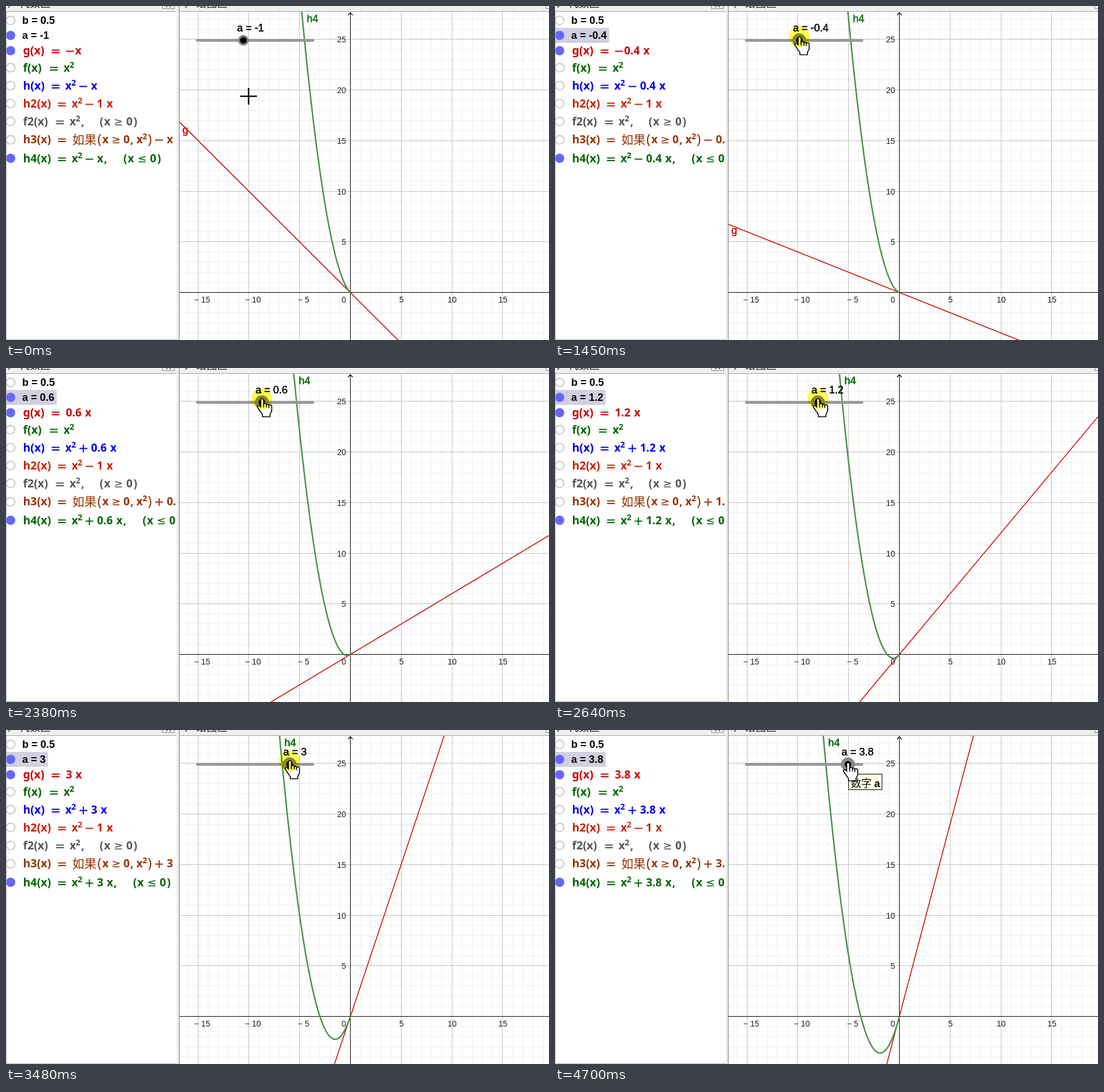
An HTML page with a canvas for the animation above (4.9 s loop, 939 by 579 pixels).

```html
<!DOCTYPE html>
<html lang="zh">
<head>
<meta charset="utf-8">
<style>
html, body { margin: 0; width: 100%; height: 100%; overflow: hidden; background: #fff; }
canvas { display: block; }
</style>
</head>
<body>
<canvas id="stage" width="939" height="579"></canvas>
<script>
const c = document.getElementById('stage').getContext('2d');
const LOOP = 4900, OX = 595.5, OY = 496.6, UNIT = 17.555;
const UI = '"Liberation Sans", Arial, sans-serif';
const MATH = 'bold 19px "Noto Sans", "Open Sans", sans-serif';
const SUP = 'bold 14px "Noto Sans", "Open Sans", sans-serif';
const REL = '19px "DejaVu Sans", sans-serif';
const CJK = '"Noto Sans CJK SC", "Noto Sans CJK", sans-serif';

// Bursts of movement: first step, last step, number of steps
const BURSTS = [[400, 890, 9], [950, 1310, 7], [1450, 1940, 8], [2070, 2590, 9],
  [2640, 3090, 8], [3190, 3680, 9], [3730, 4170, 7], [4420, 4520, 3]];
const SLOPE = [[1130, -1], [1310, -.5], [1730, -.1], [2380, .6], [2950, 2],
  [3090, 2.3], [3480, 3], [3680, 3.3], [4170, 3.8]];
const CROSS_X = [[340, 419.5], [890, 410.5]];
const CROSS_Y = [[340, 156.5], [890, 79.5]];
const HAND_Y = [[1130, 57], [1310, 53.5], [4400, 53.5], [4470, 57]];
const GLOW = [[950, 0], [1010, 1], [4370, 1], [4520, 0]];

const HAND = new Path2D('M-2 14V1Q0-2 3 1V9Q5 7 8 9V10Q10 8 12 11Q15 9 17 12V21L14 27V31H1V27L-4 20L-8 14Q-7 11-4 12Z');
const KNUCKLES = new Path2D('M3 8V15M8 9V15M12 11V16');

function snap(t) {
  let s = 0;
  for (const [from, to, n] of BURSTS) {
    const step = (to - from) / (n - 1);
    if (t >= from) s = Math.min(to, from + Math.floor((t - from + 20) / step) * step);
  }
  return s;
}

function track(t, keys) {
  if (t <= keys[0][0]) return keys[0][1];
  for (let i = 1; i < keys.length; i++) {
    const [t0, v0] = keys[i - 1], [t1, v1] = keys[i];
    if (t <= t1) return v0 + (v1 - v0) * (t - t0) / (t1 - t0);
  }
  return keys[keys.length - 1][1];
}

const px = x => OX + x * UNIT;
const py = y => OY - y * UNIT;

function rect(x, y, w, h, color) {
  c.fillStyle = color;
  c.fillRect(x, y, w, h);
}

function line(points, color, width = 1) {
  c.beginPath();
  points.forEach(([x, y]) => c.lineTo(x, y));
  c.strokeStyle = color;
  c.lineWidth = width;
  c.stroke();
}

function disc(x, y, r, fill, stroke, width = 1) {
  c.beginPath();
  c.arc(x, y, r, 0, 7);
  c.fillStyle = fill;
  c.fill();
  if (stroke) {
    c.strokeStyle = stroke;
    c.lineWidth = width;
    c.stroke();
  }
}

function text(s, x, y, font, color, align = 'left') {
  c.font = font;
  c.fillStyle = color;
  c.textAlign = align;
  c.fillText(s, x, y);
}

// Plot label of medium weight
function label(s, x, y, color) {
  text(s, x, y, '18px ' + UI, color);
  c.strokeStyle = color;
  c.lineWidth = .5;
  c.strokeText(s, x, y);
}

function clipped(x, y, w, h, draw) {
  c.save();
  c.beginPath();
  c.rect(x, y, w, h);
  c.clip();
  draw();
  c.restore();
}

// Algebra rows
function sign(kind, x, y, color) {
  if (kind === '=') {
    rect(x, y - 8.5, 13.5, 2, color);
    rect(x, y - 4, 13.5, 2, color);
    return;
  }
  rect(x, y - 6.5, 13.5, 2, color);
  if (kind === '+') rect(x + 5.75, y - 12.2, 2, 13.4, color);
}

function square(x, y, color) {
  text('x', x, y, MATH, color);
  text('2', x + 10.5, y - 7, SUP, color);
}

// Draws "n x" and returns the position of its x
function term(value, x, y, color) {
  const n = Math.abs(value);
  if (n !== 1) {
    text(n, x, y, MATH, color);
    x += c.measureText(n).width + 6;
  }
  text('x', x, y, MATH, color);
  return x;
}

function signedTerm(value, x, y, color) {
  sign(value < 0 ? '-' : '+', x, y, color);
  return term(value, x + 20, y, color);
}

function range(rel, x, y, color) {
  const put = (s, dx, font = MATH) => text(s, x + dx, y, font, color);
  put('(', 0); put('x', 7.5); put(rel, 24.5, REL); put('0', 46); put(')', 58.5);
}

function heading(name, eq, y, color) {
  text(name + '(x)', 29.5, y, MATH.replace('19', '19.5'), color);
  sign('=', eq, y, color);
}

function algebra(a) {
  rect(0, 10, 295, 569, '#fff');
  const value = 'a = ' + a, bold = 'bold 18px ' + UI;
  c.font = bold;
  if (a !== -1) rect(0, 38, 32 + c.measureText(value).width, 26, '#d0d0e0');
  [25, 51, 77.5, 107, 138, 169, 200, 232, 264].forEach((y, i) => {
    if ([1, 2, 8].includes(i)) disc(8, y, 8, '#6666ff');
    else disc(8, y, 7.5, '#fff', '#bdbdbd', 1.6);
  });
  text('b = 0.5', 28, 31, bold, '#000');
  text(value, 28, 57, bold, '#000');

  const red = '#cc0000', green = '#006600', blue = '#0000f0', rust = '#cc2200', gray = '#555', brown = '#993300';
  heading('g', 79, 84, red);
  if (a < 0) sign('-', 104, 84, red);
  term(a, a < 0 ? 119.5 : 103.5, 84, red);

  heading('f', 76, 114, green);
  square(99.5, 114, green);

  heading('h', 79, 145, blue);
  square(102.5, 145, blue);
  signedTerm(a, 127, 145, blue);

  heading('h2', 90, 176, rust);
  square(113.5, 176, rust);
  sign('-', 137.5, 176, rust);
  term(1, 174, 176, rust);
  text('1', 157, 176, MATH, rust);

  heading('f2', 86.5, 207, gray);
  square(110, 207, gray);
  text(',', 130, 207, MATH, gray);
  range('≥', 162, 207, gray);

  heading('h3', 90, 238, brown);
  text('如果', 114.5, 239, '300 21px ' + CJK, brown);
  const thin = '300 24px "Noto Sans", "Open Sans", sans-serif';
  text('(', 158, 239, thin, brown);
  text('x', 166.5, 238, MATH, brown);
  text('≥', 182.5, 238, REL, brown);
  text('0', 203, 238, MATH, brown);
  text(',', 215, 238, MATH, brown);
  square(225.5, 238, brown);
  text(')', 245, 239, thin, brown);
  signedTerm(a, 258, 238, brown);

  heading('h4', 90, 271, green);
  square(113.5, 271, green);
  const x = signedTerm(a, 137.5, 271, green);
  text(',', x + 12, 271, MATH, green);
  range('≤', x + 45.5, 271, green);
}

function grid() {
  const cols = [], rows = [];
  for (let i = -16; i <= 19; i++) cols.push(i);
  for (let i = -4; i <= 27; i++) rows.push(i);
  for (const major of [false, true]) {
    const color = major ? '#c0c0c0' : '#eeeeee';
    const keep = i => (i % 5 === 0) === major;
    for (const i of cols.filter(keep)) rect(Math.floor(px(i)), 10, 1, 569, color);
    for (const i of rows.filter(keep)) rect(300, Math.floor(py(i)), 639, 1, color);
  }
}

function axes() {
  rect(300, 496, 639, 1, '#000');
  rect(595, 11, 1, 568, '#000');
  line([[591.5, 16], [595.5, 11.5], [599.5, 16]], '#000', 1.2);
  const font = '14px ' + UI;
  for (let i = 5; i <= 25; i += 5) text(i, 588, Math.floor(py(i)) + 5.5, font, '#222', 'right');
  for (let i = 5; i <= 15; i += 5) {
    text(i, px(i) + .5, 514, font, '#222', 'center');
    text('− ' + i, px(-i) + 7, 514, font, '#222', 'center');
  }
  text('0', 588, 514, font, '#222', 'right');
}

function curves(a) {
  line([[300, py(a * (300 - OX) / UNIT)], [939, py(a * (939 - OX) / UNIT)]], '#cc0000', 1.5);
  const points = [];
  for (let x = 0; x >= -8; x -= .05) points.push([px(x), py(x * x + a * x)]);
  line(points, '#4a934a', 2.5);
  const top = (-a - Math.sqrt(a * a + 4 * (OY - 10) / UNIT)) / 2;
  label('h4', px(top) + 8.5, 28, '#006600');
  label('g', 305, py(a * (305 - OX) / UNIT) + 15, '#cc0000');
}

function slider(a) {
  const x = 430.5 + 20 * a;
  c.lineCap = 'round';
  line([[331, 59.5], [530.5, 59.5]], '#999', 5);
  c.lineCap = 'butt';
  disc(x, 59.5, a === -1 ? 8.5 : 11.5, '#8a8a8a', a === -1 ? '#555' : '#777');
  disc(x, 59.5, 5.8, '#000');
  label('a = ' + a, x - 11, 44, '#000');
}

function frameParts() {
  rect(0, 0, 939, 10, '#f0f0f0');
  rect(0, 9, 295, 1, '#a0a0a0');
  rect(300, 9, 639, 1, '#a0a0a0');
  rect(295, 0, 4, 579, '#f0f0f0');
  rect(299, 0, 1, 579, '#777');
  rect(0, 10, 1, 569, '#b0b0b0');
  rect(0, 578, 296, 1, '#b0b0b0');
  clipped(0, 0, 939, 9, () => {
    text('代数区', 23, 2, '18px ' + CJK, '#222');
    text('绘图区', 329, 2, '18px ' + CJK, '#222');
    for (const x of [4, 310]) line([[x, 3], [x + 5, -2]], '#333', 1.4);
    for (const x of [270.5, 933.5]) {
      c.strokeStyle = '#888';
      c.lineWidth = 1;
      c.strokeRect(x, -12.5, 21, 17);
    }
    line([[277, 2], [281, -2], [285, 2]], '#444', 1.3);
  });
}

function cursor(t, a) {
  if (t < 950) {
    const x = track(t, CROSS_X), y = track(t, CROSS_Y);
    line([[x - 14.5, y], [x + 14.5, y]], '#000', 2.4);
    line([[x, y - 14.5], [x, y + 14.5]], '#000', 2.4);
    return;
  }
  const x = 430.5 + 20 * a, y = track(t, HAND_Y);
  c.save();
  c.translate(x, y);
  c.fillStyle = '#fff';
  c.fill(HAND);
  c.strokeStyle = '#000';
  c.lineWidth = 1.6;
  c.stroke(HAND);
  c.stroke(KNUCKLES);
  c.globalCompositeOperation = 'multiply';
  disc(0, 0, 18, `rgba(255, 250, 80, ${track(t, GLOW)})`);
  c.restore();
}

function tooltip() {
  rect(507, 76, 59, 28, '#000');
  rect(508, 77, 57, 26, '#ffffe1');
  text('数字', 511.5, 99, '300 18px ' + CJK, '#000');
  text('a', 552, 99, 'bold 18px ' + UI, '#000');
}

function draw(time) {
  const t = snap(time);
  const a = Math.round(track(t, SLOPE) * 10) / 10 || 0;
  rect(0, 0, 939, 579, '#fff');
  clipped(300, 10, 639, 569, () => {
    grid();
    axes();
    curves(a);
    slider(a);
  });
  clipped(0, 10, 295, 569, () => algebra(a));
  frameParts();
  if (time >= 4700) tooltip();
  cursor(t, a);
}

const start = performance.now();
function tick() {
  draw((performance.now() - start) % LOOP);
  requestAnimationFrame(tick);
}
tick();
</script>
</body>
</html>
```
